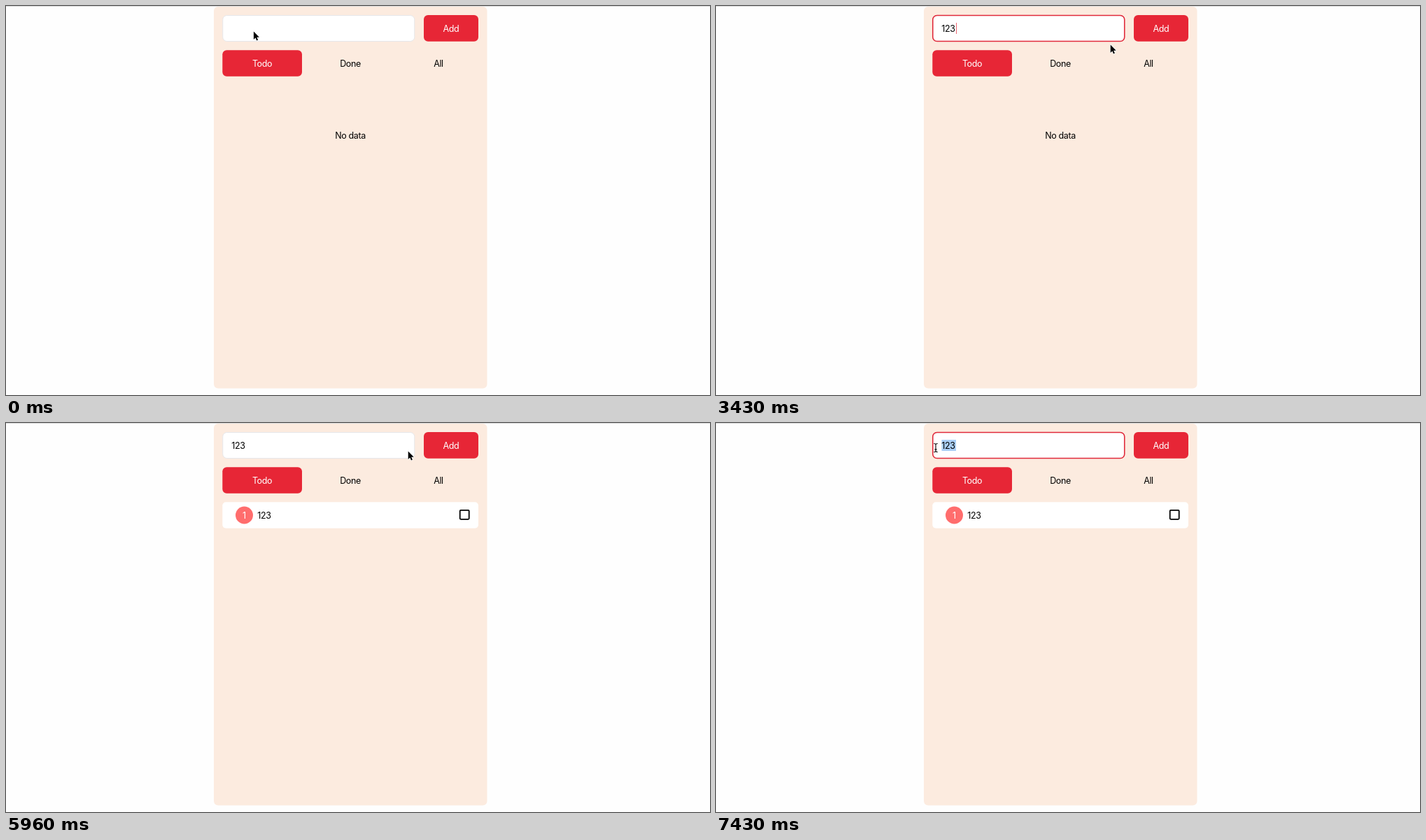
Animation of 1006 by 557 pixels, one loop 8 s. Source, as an HTML page:

```html
<!DOCTYPE html>
<html lang="en">
<head>
<meta charset="utf-8">
<title>Todo list</title>
<style>
  html, body { margin: 0; width: 100%; height: 100%; overflow: hidden; background: #fefefe; }
  svg { display: block; }
  text { font: 400 12.5px Inter, "Open Sans", sans-serif; letter-spacing: -0.375px; white-space: pre; }
  .mid { text-anchor: middle; }
  .red { fill: #e72636; }
  .white { fill: #fff; }
</style>
</head>
<body>
<svg width="1006" height="557" viewBox="0 0 1006 557">
  <rect width="1006" height="1" fill="#dcdcdc"/>
  <rect x="297" y="1" width="390.5" height="546.5" rx="6" fill="#fcebdf"/>

  <rect id="field" x="309.75" y="13.5" width="274" height="37" rx="6" fill="#fff"/>
  <rect id="selection" y="24" height="16" fill="#abcff6"/>
  <text id="value" x="322.3" y="37"></text>
  <rect id="caret" y="24" width="1" height="16" class="red" opacity=".7"/>

  <rect x="597" y="13" width="78" height="37.7" rx="6" class="red"/>
  <text x="635.8" y="37" class="mid white">Add</text>
  <rect x="309.3" y="63.3" width="113.7" height="37.4" rx="6" class="red"/>
  <text x="366" y="87" class="mid white">Todo</text>
  <text x="492" y="87" class="mid">Done</text>
  <text x="618" y="87" class="mid">All</text>

  <text id="empty" x="492" y="190" class="mid">No data</text>
  <g id="item">
    <rect x="309.3" y="113.3" width="365.7" height="37.5" rx="5" class="white"/>
    <circle cx="340.5" cy="132" r="12.5" fill="#ff6d6d"/>
    <text x="340.3" y="137" class="mid white">1</text>
    <text x="359.2" y="137">123</text>
    <rect x="648.7" y="124.8" width="13" height="13" rx="1.2" fill="none" stroke="#000" stroke-width="1.8"/>
  </g>

  <g id="arrow">
    <path d="M0 0V11.4L2.6 9L4.3 12.8L6.2 12L4.5 8.2H8Z" stroke="#fff" stroke-width="1.4" stroke-linejoin="round" paint-order="stroke"/>
  </g>
  <g id="beam" fill="none">
    <path id="beamLine" d="M-2.7 -6Q0 -6 0 -4.4Q0 -6 2.7 -6M0 -4.4V4.4M-2.7 6Q0 6 0 4.4Q0 6 2.7 6M-1.5 2.4H1.5" stroke="#fff" stroke-width="2"/>
    <use href="#beamLine" style="display:none"/>
    <path d="M-2.7 -6Q0 -6 0 -4.4Q0 -6 2.7 -6M0 -4.4V4.4M-2.7 6Q0 6 0 4.4Q0 6 2.7 6M-1.5 2.4H1.5" stroke="#000" stroke-width="1.1"/>
  </g>
  <g id="hand">
    <path d="M3.6 7.4L2.1 2.1Q1.9 .9 2.8 .7Q3.6 .6 3.9 1.6L4.9 4.9Q5.6 4.1 6.4 4.9Q7.3 4.2 8 5.1Q9.2 4.6 9.7 5.9L10.4 8.6Q10.6 10 9.8 11L9.6 12.6H5L4.7 11.6L1.3 8.9Q.7 8 1.4 7.5Q2.2 7.1 3.6 8.3Z" fill="#fff" stroke="#000" stroke-width=".95" stroke-linejoin="round"/>
  </g>
</svg>
<script>
const LOOP = 8000;
const $ = id => document.getElementById(id);
const at = (kind, x, y) => ({ kind, x, y });

// Each step changes part of the state and holds until the next one.
const steps = [
  [0, { ...at('arrow', 353.9, 36.6), value: '', focus: false, caret: 0, from: 0, item: false }],
  [1340, at('beam', 351, 37)],
  [1640, { focus: true, caret: 322 }],
  [2090, { caret: 0 }],
  [2540, { value: '1', caret: 328 }],
  [2840, { value: '12', caret: 335 }],
  [3140, { value: '123', caret: 343 }],
  [3280, at('beam', 464, 30)],
  [3430, at('arrow', 563.7, 55.6)],
  [3570, { ...at('hand', 594.8, 48), caret: 0 }],
  [3720, at('hand', 609.3, 41)],
  [3870, at('hand', 610.3, 41)],
  [4020, { focus: false }],
  [4160, { item: true }],
  [5960, at('arrow', 574.7, 40.6)],
  [6110, at('beam', 408.5, 47)],
  [6250, at('beam', 381.5, 47.5)],
  [6400, at('beam', 380.5, 47.5)],
  [6550, at('beam', 376.5, 47)],
  [6700, at('beam', 363, 36.5)],
  [6840, at('beam', 361.3, 35.5)],
  [6990, { ...at('beam', 349.5, 35.5), focus: true, caret: 343 }],
  [7140, { ...at('beam', 316.5, 35.5), caret: 0, from: 328 }],
  [7280, { ...at('beam', 313.7, 35), from: 322.5 }],
  [7430, at('beam', 314, 35.5)]
];

const show = (id, on) => $(id).setAttribute('visibility', on ? 'visible' : 'hidden');

function set(id, attrs) {
  for (const key in attrs) $(id).setAttribute(key, attrs[key]);
}

function draw(time) {
  const s = {};
  for (const [start, change] of steps) if (start <= time) Object.assign(s, change);

  set('field', { stroke: s.focus ? '#e02a3b' : '#e6e7ea', 'stroke-width': s.focus ? 1.6 : 1 });
  $('value').textContent = s.value;
  show('caret', s.caret);
  set('caret', { x: s.caret });
  show('selection', s.from);
  set('selection', { x: s.from, width: s.from ? 343 - s.from : 0 });
  show('empty', !s.item);
  show('item', s.item);
  for (const kind of ['arrow', 'beam', 'hand']) show(kind, kind === s.kind);
  set(s.kind, { transform: `translate(${s.x} ${s.y})` });
}

const begin = performance.now();
function tick() {
  draw((performance.now() - begin) % LOOP);
  requestAnimationFrame(tick);
}
tick();
</script>
</body>
</html>
```
